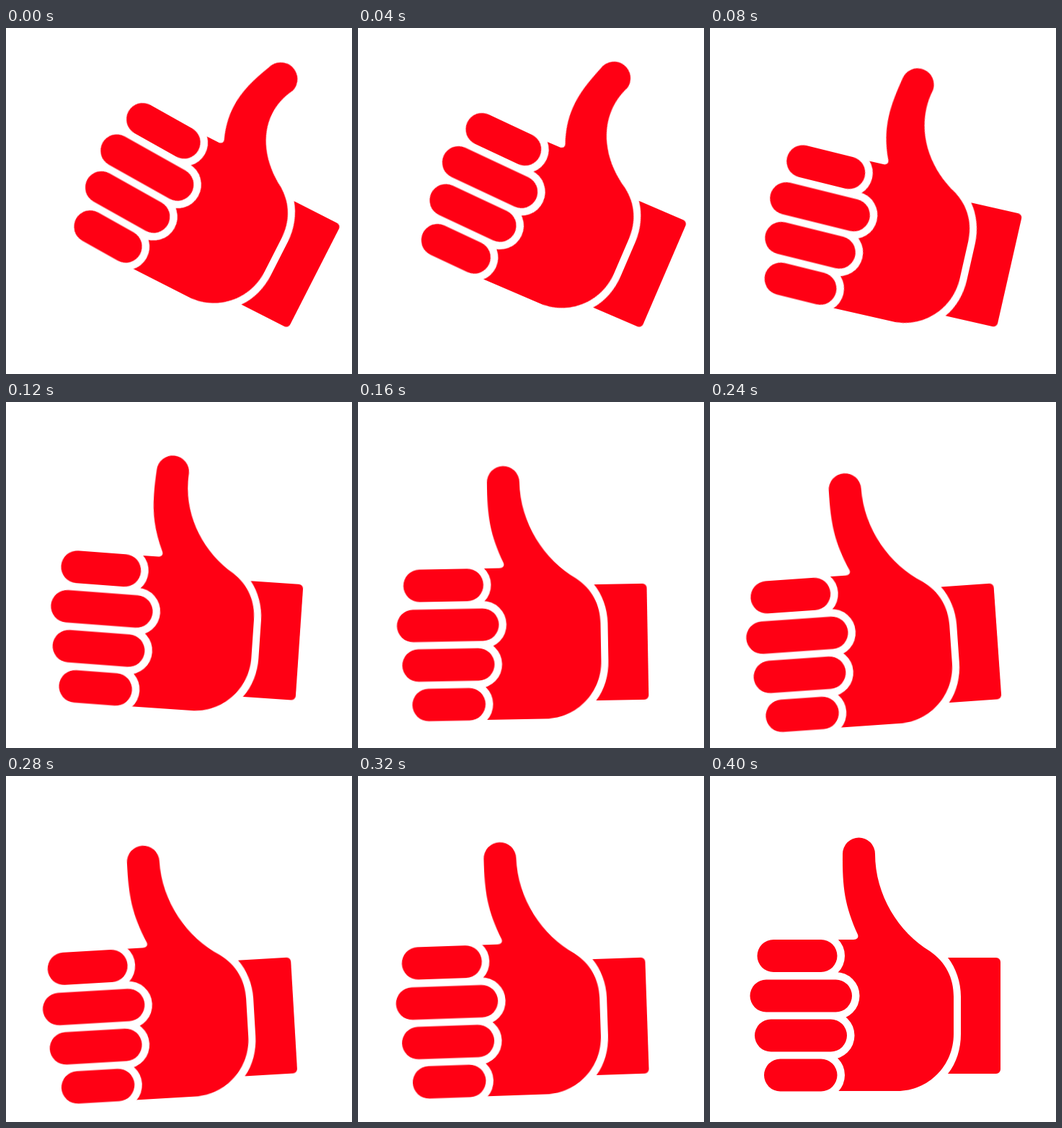
An HTML page for the animation above (1440 ms loop, 480 by 480 pixels).

```html
<!DOCTYPE html>
<html lang="en">
<head>
<meta charset="utf-8">
<title>Thumbs up</title>
<style>
  html, body { margin: 0; width: 100%; height: 100%; overflow: hidden; background: #fff; }
  svg { display: block; width: 100%; height: 100%; fill: #ff0014; }

  .hand, .palm, .fingers { animation: 1440ms linear infinite; }
  .hand { transform-origin: 389.5px 391px; animation-name: swing; }
  .fingers { transform-origin: 174px 330px; animation-name: fan; }
  .palm { animation-name: bend; }

  .fingers { fill: none; stroke: #ff0014; stroke-width: 45; stroke-linecap: round; }
  .gap { stroke: #fff; stroke-width: 66; }

  /* Swing past upright, then settle and hold */
  @keyframes swing {
    0% { transform: rotate(27deg); animation-timing-function: cubic-bezier(.32, 0, .3, 1); }
    16.667% { transform: rotate(-4deg); animation-timing-function: cubic-bezier(.33, 0, .67, 1); }
    27.778%, 100% { transform: rotate(0deg); }
  }
  @keyframes fan {
    0% { transform: rotate(2.3deg); animation-timing-function: cubic-bezier(.25, 0, .75, 1); }
    11.111%, 100% { transform: rotate(0deg); }
  }
  /* The thumb starts bent back and straightens */
  @keyframes bend {
    0% {
      d: path("M150 227 L199 227 C204 227 206.5 224 205 220 C187 175 198 140 214.5 103 A22 22 0 0 1 259 116 C232 165 257 215 305 243 C327 258 338 280 338 306 L338 358 C338 402 303 437 260 437 L150 437 Z");
      animation-timing-function: cubic-bezier(.25, 0, .75, 1);
    }
    11.111%, 100% {
      d: path("M150 227 L199 227 C204 227 206.5 224 205 220 C187 180 183.5 155 184 108 A22 22 0 0 1 229 108 C229 165 262 217 305 243 C327 258 338 280 338 306 L338 358 C338 402 303 437 260 437 L150 437 Z");
    }
  }
</style>
</head>
<body>
<svg viewBox="0 0 480 480">
  <defs>
    <path id="rows" d="M88 249.5H154M78 305H174.5M84.5 360H167.5M97.5 415H154"/>
  </defs>
  <g class="hand">
    <path d="M330 252H397a6 6 0 0 1 6 6V407a6 6 0 0 1 -6 6H330C342 398 348 378 348 358V306C348 286 341 266 330 252Z"/>
    <path class="palm" d="M150 227 L199 227 C204 227 206.5 224 205 220 C187 180 183.5 155 184 108 A22 22 0 0 1 229 108 C229 165 262 217 305 243 C327 258 338 280 338 306 L338 358 C338 402 303 437 260 437 L150 437 Z"/>
    <g class="fingers">
      <use class="gap" href="#rows"/>
      <use href="#rows"/>
    </g>
  </g>
</svg>
</body>
</html>
```
